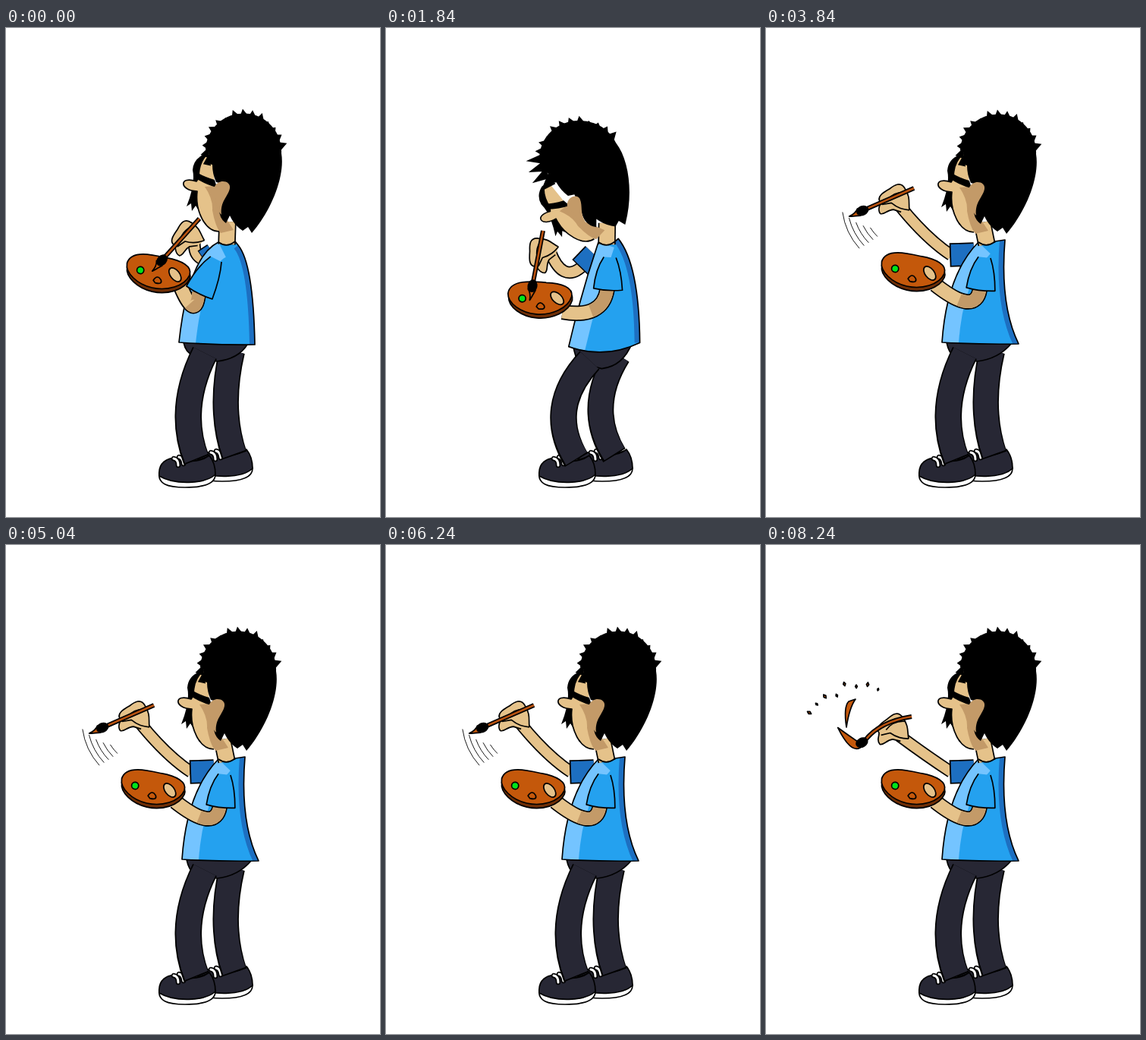
An HTML page that plays this animation: 493x644 px, repeating every 8400 ms.

```html
<!DOCTYPE html>
<html lang="en">
<head>
<meta charset="utf-8">
<title>Painter</title>
<style>
  html, body { margin: 0; width: 100%; height: 100%; overflow: hidden; background: #fff; }
  svg {
    display: block; width: 100%; height: 100%;
    --skin: #e5c28a; --tan: #c39a68; --pants: #272734; --paint: #c4580b;
    --blue: #24a1ef; --light: #74c4ff; --navy: #1d6fc1;
  }
  path, ellipse, circle { stroke: #000; stroke-width: 1.7; stroke-linejoin: round; }
  .flat { stroke: none; }
  .line { fill: none; }
  .tube path { fill: none; stroke: var(--c); stroke-width: var(--w); }
  .tube path:first-child { stroke: #000; stroke-width: calc(var(--w) + 3.4px); }
  .round path { stroke-linecap: round; }
</style>
</head>
<body>
<svg viewBox="0 0 493 644">
  <defs>
    <clipPath id="inShirt"><path id="shirtClip"/></clipPath>
    <g id="shoe">
      <path fill="#fff" d="M202 586C200 600 212 605 236 605C262 605 276 599 276 588L268 564Z"/>
      <path fill="var(--pants)" d="M202 590C200 572 213 566 225 566Q250 576 268 563Q276 573 276 588C262 601 222 602 202 590Z"/>
      <g class="tube round" style="--c:#fff;--w:3px">
        <path d="M221 567q6 1 6 9M228 565q5 1 6 9"/><path d="M221 567q6 1 6 9M228 565q5 1 6 9"/>
      </g>
    </g>
  </defs>

  <use href="#shoe" transform="translate(49 -8)"/>
  <g class="tube" id="farLeg" style="--c:var(--pants);--w:31px"><path/><path/></g>
  <use href="#shoe"/>
  <path id="pelvis" fill="var(--pants)"/>
  <g class="tube" id="nearLeg" style="--c:var(--pants);--w:32px"><path/><path/></g>

  <g class="tube" id="farArm" style="--c:var(--skin);--w:13px"><path/><path/></g>
  <g class="tube" id="farSleeve" style="--c:var(--navy);--w:28px"><path/><path/></g>
  <g clip-path="url(#inShirt)">
    <path class="flat" id="shirtFill" fill="var(--blue)"/>
    <path class="line" id="shirtFront" style="stroke:var(--light);stroke-width:44px"/>
    <path class="line" id="shirtBack" style="stroke:var(--navy);stroke-width:14px"/>
  </g>
  <path class="line" id="shirtEdge"/>
  <g class="tube" id="nearArm" style="--c:var(--skin);--w:17px"><path/><path/>
    <path id="armShade" style="stroke:var(--tan)" pathLength="1" stroke-dasharray=".5 1"/></g>
  <path id="sleeve" fill="var(--blue)"/>

  <g class="tube" id="neck" style="--c:var(--skin);--w:20px"><path/><path/></g>
  <path class="line" d="M280 282Q291 290 302 281"/>
  <g class="face">
    <path class="flat" d="M262 166Q247 172 246 187Q250 205 238 235L244 231L245 241L250 234L255 242L264 215Z"/>
    <path fill="var(--skin)" d="M271 162Q254 172 254 197L251 202C228 194 228 214 252 215C249 240 262 268 281 268"/>
    <path class="flat" fill="var(--tan)" d="M262 209Q273 225 272 240Q276 262 283 270L300 266L283 240L276 208Z"/>
  </g>
  <g id="hair">
    <path class="flat" d="M264 178L268 164L263 160A50 50 0 0 1 363 165C368 195 350 240 324 270L319 262L312 267Q301 260 295 247L290 257Q277 248 283 228L285 205L277 203Q272 192 272 180Z"/>
    <path class="flat" id="tufts"/>
  </g>
  <g class="face">
    <path class="flat" d="M249 188Q256 194 275 200L278 210Q264 207 247 196Z"/>
    <path class="flat" fill="var(--tan)" d="M275 209C280 198 297 201 295 211C293 222 282 228 284 246Q276 240 275 209Z"/>
  </g>

  <g id="palette">
    <path fill="#6e2e06" transform="translate(1 5)" d="M-42 -5C-40 -24 -10 -22 8 -21C28 -21 44 -16 42 -4C38 12 16 22 -4 21C-24 20 -42 8 -42 -5Z"/>
    <path fill="var(--paint)" d="M-42 -5C-40 -24 -10 -22 8 -21C28 -21 44 -16 42 -4C38 12 16 22 -4 21C-24 20 -42 8 -42 -5Z"/>
    <circle cx="-23" cy="1" r="4.6" fill="#00e51a"/>
    <path fill="var(--paint)" d="M-4 11Q0 2 6 9Q9 15 -1 14Z"/>
    <ellipse rx="10.5" ry="6" fill="var(--skin)" transform="translate(23 -1) rotate(42)"/>
  </g>

  <g id="brush">
    <path fill="var(--skin)" d="M17 -24C14 -14 9 -10 11 4C12 16 22 14 30 12C38 11 50 10 48 1C50 -4 56 -6 54 -13C50 -17 44 -12 36 -15L28 -22"/>
    <path class="line" d="M17 -24C24 -20 30 -16 35 -6L47 -3M10 -2Q24 7 38 0"/>
    <g class="tube" id="handle" style="--c:#b9520f;--w:2.6px"><path/><path/></g>
    <path id="tip" fill="var(--paint)"/>
    <ellipse class="flat" cx="74" rx="8.5" ry="6.5"/>
  </g>

  <path class="line" id="trails" style="stroke-width:.9px"/>
  <path id="blade" fill="var(--paint)" d="M106 240Q102 213 109 206L118 203Q110 214 106 240Z"/>
  <path id="drops" fill="var(--paint)"/>
</svg>
<script>
const LOOP = 8400;
const ANKLE = { near: [251, 567], far: [301, 561] };
const COLLAR = { front: [280, 282], back: [302, 281] };

const stand = {
  hip: [262, 428], knee: [225, 502], farHip: [298, 425], farKnee: [280, 502],
  hemFront: [228, 414], hemBack: [328, 417], sag: 2,
  belly: [240, 302], back: [326, 310], shoulder: [306, 286],
  sleeve: [276, 304], cuff: [254, 348], elbow: [250, 388],
  farCuff: [262, 306], farElbow: [246, 300],
  head: [290, 283], faceTilt: 0, hairTilt: 0, lean: 0,
  palette: [200, 322], roll: 10,
  brush: [255, 251], aim: 132, flex: 0
};
const crouch = {
  hip: [270, 440], knee: [206, 500], farHip: [308, 432], farKnee: [258, 500],
  hemFront: [243, 421], hemBack: [335, 414], sag: 24,
  belly: [262, 355], back: [340, 298], shoulder: [304, 277],
  sleeve: [296, 302], cuff: [294, 344], elbow: [288, 384],
  farCuff: [261, 319], farElbow: [238, 350],
  head: [291, 285], faceTilt: -42, hairTilt: -33, lean: 1,
  palette: [205, 365], roll: 0,
  brush: [210, 281], aim: 87, flex: 0
};
const reach = {
  ...stand,
  hemFront: [232, 414], hemBack: [333, 416],
  belly: [238, 325], back: [308, 365], shoulder: [315, 279],
  sleeve: [287, 302], cuff: [282, 344], elbow: [276, 380],
  farCuff: [244, 299], farElbow: [212, 278],
  head: [283, 284], palette: [193, 320],
  brush: [195, 211], aim: 156.5
};
const flick = { ...reach, brush: [192, 226], aim: 152.5, flex: 1 };

const $ = id => document.getElementById(id);
const draw = (id, d) => $(id).setAttribute('d', d);
const place = (node, t) => node.setAttribute('transform', t);
const tube = (id, d) => { for (const p of $(id).children) p.setAttribute('d', d); };
const add = (p, x, y) => [p[0] + x, p[1] + y];
const arc = (a, ctrl, b) => `M${a}Q${ctrl} ${b}`;
const polar = (c, r, deg) => add(c, r * Math.cos(deg * Math.PI / 180), r * Math.sin(deg * Math.PI / 180));
const noise = i => { const v = Math.sin(i * 12.9898 + 4) * 43758.5453; return v - Math.floor(v); };

const lerp = (a, b, t) => Array.isArray(a) ? a.map((v, i) => lerp(v, b[i], t)) : a + (b - a) * t;
const mix = (a, b, t) => Object.fromEntries(Object.keys(a).map(k => [k, lerp(a[k], b[k], t)]));
const smooth = t => t * t * (3 - 2 * t);

function drawLegs(p) {
  tube('farLeg', arc(p.farHip, p.farKnee, ANKLE.far));
  tube('nearLeg', arc(p.hip, p.knee, ANKLE.near));
  // The ink runs a little past the cloth to make the hems.
  $('farLeg').firstElementChild.setAttribute('d', arc(p.farHip, p.farKnee, add(ANKLE.far, 0, 2)));
  $('nearLeg').firstElementChild.setAttribute('d', arc(p.hip, p.knee, add(ANKLE.near, 0, 2)));
  const front = add(p.hemFront, 6, 0), rear = add(p.hemBack, -10, 0);
  draw('pelvis', `M${front}Q${add(front, 3, 14)} ${add(p.hip, -15, 3)}` +
    `L${add(p.hip, 16, 11)}Q${add(p.hip, 44, 8)} ${rear}`);
}

function drawShirt(p) {
  const hem = lerp(p.hemFront, p.hemBack, .5);
  const outline = `M${COLLAR.front}Q${p.belly} ${p.hemFront}Q${add(hem, 0, p.sag)} ${p.hemBack}` +
    `Q${p.back} ${p.shoulder}L${COLLAR.back}`;
  const closed = outline + `Q291 290 ${COLLAR.front}Z`;
  draw('shirtClip', closed);
  draw('shirtFill', closed);
  draw('shirtEdge', outline);
  draw('shirtFront', arc(COLLAR.front, p.belly, p.hemFront));
  draw('shirtBack', `M${p.hemBack}Q${p.back} ${p.shoulder}`);
}

function drawArms(p) {
  const wrist = polar(polar(p.brush, 26, p.aim), 15, p.aim - 90);
  tube('farArm', arc(p.farCuff, p.farElbow, wrist));
  tube('farSleeve', `M274 298L${p.farCuff}`);
  $('farSleeve').firstElementChild.setAttribute('d', `M274 298L${lerp([274, 298], p.farCuff, 1.06)}`);
  tube('nearArm', arc(p.cuff, p.elbow, add(p.palette, 30, 18)));

  const dir = Math.atan2(p.cuff[1] - p.sleeve[1], p.cuff[0] - p.sleeve[0]) * 180 / Math.PI;
  const side = (at, r) => polar(at, r, dir + 90);
  const mid = lerp(p.sleeve, p.cuff, .4);
  draw('sleeve', `M${side(p.sleeve, 7)}Q${side(mid, 17)} ${side(p.cuff, 18)}` +
    `Q${polar(p.cuff, 3, dir)} ${side(p.cuff, -20)}Q${side(mid, -17)} ${side(p.sleeve, -9)}`);
}

function drawHead(p) {
  const pivot = (deg, sx, sy) =>
    `translate(${p.head}) scale(${sx} ${sy}) rotate(${deg}) translate(-290 -283)`;
  const shrink = 1 - .07 * p.lean;
  for (const g of document.querySelectorAll('.face')) place(g, pivot(p.faceTilt, shrink, shrink));
  place($('hair'), pivot(p.hairTilt, 1 + .06 * p.lean, 1 - .04 * p.lean));
  tube('neck', `M291 285L${add(p.head, 2, -28)}`);

  let d = '';
  for (let a = 168, i = 0; a < 352; a += 13, i++) {
    const centre = [313, 165];
    const fringe = a < 215 ? 15 * p.lean : 0;
    d += `M${polar(centre, 46, a - 9)}L${polar(centre, 52 + 7 * noise(i) + fringe, a - 3)}` +
      `L${polar(centre, 46, a + 10)}Z`;
  }
  draw('tufts', d);
}

function drawTools(p) {
  place($('palette'), `translate(${p.palette}) rotate(${p.roll})`);
  place($('brush'), `translate(${p.brush}) rotate(${p.aim})`);
  tube('handle', `M0 0Q42 ${14 * p.flex} 70 0`);
  draw('tip', `M79 -5Q94 ${-6 * p.flex} 93 ${32 * p.flex}Q84 ${14 * p.flex} 79 5Z`);
}

function drawEffects(phase) {
  let trails = '', drops = '';
  for (let i = 0; i < 5; i++) {
    const r = 90 - 7 * i, from = 172 - 6 * i, to = 138 - i;
    trails += `M${polar([190, 230], r, from)}A${r} ${r} 0 0 0 ${polar([190, 230], r, to)}`;
  }
  for (let i = 0; i < 8; i++) {
    const angle = -148 + 11 * i, size = 1.5 + 1.5 * noise(i + 20);
    const at = polar([123, 262], 70 + 20 * noise(i + 40), angle);
    drops += `M${polar(at, size, angle)}L${polar(at, size * .6, angle + 90)}` +
      `L${polar(at, size, angle + 180)}L${polar(at, size * .6, angle - 90)}Z`;
  }
  draw('trails', phase === 0 ? trails : '');
  draw('drops', phase >= 4 ? drops : '');
  $('blade').style.display = phase === 4 ? '' : 'none';
}

function poseAt(step) {
  if (step <= 4) return mix(stand, crouch, smooth(step / 4));
  if (step <= 8) {
    const stir = 4 * Math.sin((step - 4) * Math.PI / 2);
    return { ...crouch, brush: add(crouch.brush, stir, 0) };
  }
  if (step < 13) return mix(crouch, reach, (step - 8) / 5);
  return mix(reach, flick, 1 - Math.abs((step - 13) % 6 - 4) / 4);
}

let shown = -1;
function render(time) {
  // Drawings change every 200 ms, held to an 80 ms grid.
  const tick = Math.floor((time % LOOP) / 80) * 80;
  const step = Math.ceil((tick + 40) / 200) - 1;
  if (step === shown) return;
  shown = step;
  const p = poseAt(step);
  for (const part of [drawLegs, drawShirt, drawArms, drawHead, drawTools]) part(p);
  drawEffects(step < 13 ? -1 : (step - 13) % 6);
}

const start = performance.now();
function loop() {
  render(performance.now() - start);
  requestAnimationFrame(loop);
}
loop();
</script>
</body>
</html>
```
